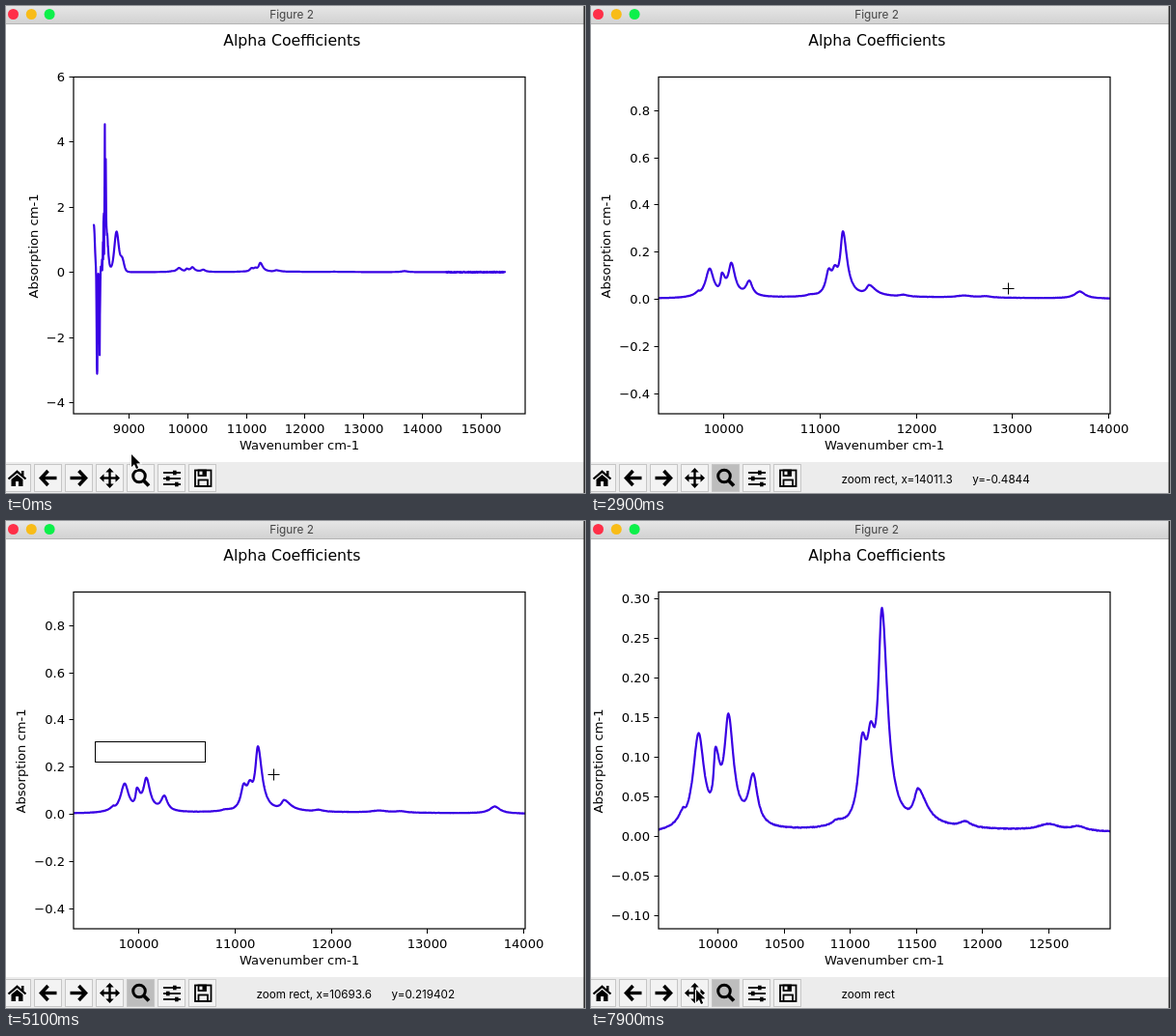
Recreate the animation shown at these times as an HTML page with a canvas. Size 600x504 px, loop 8000 ms.

```html
<!DOCTYPE html>
<html lang="en">
<head>
<meta charset="utf-8">
<title>Figure 2</title>
<style>
html, body { margin: 0; width: 600px; height: 504px; overflow: hidden; background: #fff; }
canvas { display: block; }
</style>
</head>
<body>
<canvas id="stage" width="600" height="504"></canvas>
<script>
const ctx = document.getElementById('stage').getContext('2d');
const LOOP = 8000, STEP = 100, LAG = 100;
const PLOT = { left: 70, top: 73.5, right: 538, bottom: 422 };
const PLOT_FONT = '"DejaVu Sans", sans-serif';
const UI_FONT = 'Inter, sans-serif';
const INK = '#000', CURVE = '#3900e4';

// Each view maps data to pixels; ticks are [first, last, step, decimals].
const makeView = (x0, px0, kx, py0, ky, xTicks, yTicks, labelX) => ({
  px: x => px0 + (x - x0) * kx,
  py: y => py0 - y * ky,
  x: px => x0 + (px - px0) / kx,
  y: py => (py0 - py) / ky,
  xTicks, yTicks, labelX
});
const WIDE = makeView(9000, 127.5, 0.06075, 275.5, 33.75, [9000, 15000, 1000, 0], [-4, 6, 2, 0], 28);
const MID = makeView(10000, 137.5, 0.09975, 303.5, 243.9, [10000, 14000, 1000, 0], [-0.4, 0.8, 0.2, 1], 15);
const CLOSE = makeView(10000, 131.5, 0.1372, 326.5, 820, [10000, 12500, 500, 0], [-0.1, 0.3, 0.05, 2], 7);

// Absorption bands: centre, height, half width (left, then right if it differs).
const BANDS = [
  [9738, 0.011, 51, 15], [9854, 0.12, 51], [9982, 0.075, 17, 40], [10080, 0.13, 36, 47],
  [10266, 0.062, 40], [10900, 0.006, 51], [11090, 0.09, 36], [11155, 0.08, 36],
  [11239, 0.262, 33, 51], [11512, 0.042, 36, 80], [11870, 0.007, 51], [12496, 0.008, 95],
  [12722, 0.0055, 66], [13700, 0.0295, 66]
];
// Strong features at the low end: centre, height, width.
const EDGE = [
  [8400, 1.45, 25], [8455, -3.95, 10], [8498, -3.55, 10], [8590, 2.2, 50], [8592, 3.3, 12],
  [8786, 0.85, 45], [8800, 0.4, 100], [8885, 0.25, 40]
];
const gauss = (x, c, h, w) => h * Math.exp(-(((x - c) / w) ** 2));
const lorentz = (x, c, h, wl, wr = wl) => h / (1 + ((x - c) / (x < c ? wl : wr)) ** 2);
const total = (list, shapeOf, x) => list.reduce((sum, p) => sum + shapeOf(x, ...p), 0);

function makeSpectrum() {
  let seed = 7;
  const random = () => (seed = seed * 16807 % 2147483647) / 2147483647;
  const points = [];
  for (let x = 8399; x <= 15411; x += 4) {
    const edge = total(EDGE, gauss, x) * (1 - gauss(x, 8540, 1, 70) * random());
    const ripple = (random() - 0.5) * (x > 14400 ? 0.03 : 0.001);
    points.push([x, edge + gauss(x, 11500, 0.008, 2200) + total(BANDS, lorentz, x) + ripple]);
  }
  return points;
}
const spectrum = makeSpectrum();

// Pointer keys: [time, x, y]; `at` gives a place by its data values.
const at = (view, x, y) => [view.px(x), view.py(y)];
const dragEnd = at(WIDE, 14011.3, -0.4844);
const path = [
  [0, 130, 464], [500, 139, 486], [800, 150, 250],
  [1000, ...at(WIDE, 9493.75, 0.0194909)], [1400, 147.5, 243.5], [1700, 147.5, 243.5],
  [2100, ...at(WIDE, 12163.9, 0.0754788)], [2700, ...dragEnd], [4000, ...dragEnd],
  [4650, 92.5, 228.5], [4800, 92.5, 228.5],
  [5000, ...at(MID, 10693.6, 0.219402)], [5100, 277, 262], [5800, ...at(MID, 12914.8, -0.116661)],
  [6000, 433, 332], [6900, 433, 332], [7800, 109, 485], [LOOP, 109, 485]
];
const drags = [
  { from: 1700, to: 2900, x: 147.5, y: 243.5 },
  { from: 4800, to: 6200, x: 92.5, y: 228.5 }
];

function pointerAt(t) {
  t = Math.max(0, t);
  const i = Math.max(1, path.findIndex(key => key[0] >= t));
  const [t0, x0, y0] = path[i - 1], [t1, x1, y1] = path[i];
  const u = (t - t0) / (t1 - t0), eased = u * u * (3 - 2 * u);
  return { x: x0 + (x1 - x0) * eased, y: y0 + (y1 - y0) * eased };
}
const inPlot = p => p.x > PLOT.left && p.x < PLOT.right && p.y > PLOT.top && p.y < PLOT.bottom;

function text(str, x, y, size, family, align = 'left', color = INK) {
  ctx.font = `${size}px ${family}`;
  ctx.textAlign = align;
  ctx.fillStyle = color;
  ctx.fillText(str, x, y);
}
function box(x, y, w, h, color) {
  ctx.fillStyle = color;
  ctx.fillRect(x, y, w, h);
}
function frame(x, y, w, h, width = 1, color = INK) {
  ctx.lineWidth = width;
  ctx.strokeStyle = color;
  ctx.strokeRect(x, y, w, h);
}
function line(points, width, color = INK) {
  ctx.beginPath();
  points.forEach(([x, y]) => ctx.lineTo(x, y));
  ctx.lineWidth = width;
  ctx.strokeStyle = color;
  ctx.stroke();
}
function shape(points, color = INK) {
  ctx.beginPath();
  points.forEach(([x, y]) => ctx.lineTo(x, y));
  ctx.fillStyle = color;
  ctx.fill();
}
function circle(x, y, r) {
  ctx.beginPath();
  ctx.arc(x, y, r, 0, 2 * Math.PI);
}
const crisp = v => Math.floor(v) + 0.5;

function drawTitleBar() {
  const shade = ctx.createLinearGradient(0, 0, 0, 18);
  shade.addColorStop(0, '#e6e6e6');
  shade.addColorStop(1, '#d2d2d2');
  box(0, 0, 600, 18, shade);
  box(0, 18, 600, 1, '#b4b4b4');
  ['#ff2f48', '#f8bc18', '#0cf04a'].forEach((color, i) => {
    circle(7.5 + i * 18.8, 8.5, 5.5);
    ctx.fillStyle = color;
    ctx.fill();
  });
  text('Figure 2', 296, 13, 11.8, UI_FONT, 'center', '#444');
}

function ticks([first, last, step, digits], draw) {
  const count = Math.round((last - first) / step);
  for (let i = 0; i <= count; i++) {
    const value = first + i * step;
    const label = Math.abs(value).toFixed(digits);
    draw(value, value < -1e-9 ? '\u2212' + label : label);
  }
}

function drawAxes(view) {
  text('Alpha Coefficients', 296.3, 41, 15.73, PLOT_FONT, 'center');
  text('Wavenumber cm-1', 304, 459, 13.1, PLOT_FONT, 'center');
  ctx.save();
  ctx.translate(view.labelX + 4.5, 248.5);
  ctx.rotate(-Math.PI / 2);
  text('Absorption cm-1', 0, 0, 13.1, PLOT_FONT, 'center');
  ctx.restore();
  ticks(view.xTicks, (value, label) => {
    const x = crisp(view.px(value));
    line([[x, 422], [x, 427]], 1);
    text(label, x, 441.5, 13.1, PLOT_FONT, 'center');
  });
  ticks(view.yTicks, (value, label) => {
    const y = crisp(view.py(value));
    line([[65.5, y], [70, y]], 1);
    text(label, 61, y + 4.8, 13.1, PLOT_FONT, 'right');
  });
}

function drawCurve(view) {
  const width = PLOT.right - PLOT.left, height = PLOT.bottom - PLOT.top;
  ctx.save();
  ctx.beginPath();
  ctx.rect(PLOT.left, PLOT.top, width, height);
  ctx.clip();
  ctx.lineJoin = ctx.lineCap = 'round';
  line(spectrum.map(([x, y]) => [view.px(x), view.py(y)]), 2.2, CURVE);
  ctx.restore();
  frame(PLOT.left, PLOT.top, width, height, 1.2);
}

function arrowIcon(x, dir) {
  line([[x, 481], [x - 7 * dir, 488.5], [x, 496]], 3.6);
  line([[x - 6 * dir, 488.5], [x + 9 * dir, 488.5]], 3.4);
}
const icons = [
  function home() {
    line([[2.5, 489.5], [11.5, 481.8], [20.5, 489.5]], 2.2);
    shape([[5.5, 490], [11.5, 485], [17.5, 490], [17.5, 497], [5.5, 497]]);
    box(10, 492, 3, 5, '#f3f3f3');
    box(16, 481, 2.5, 5, INK);
  },
  () => arrowIcon(43.5, 1),
  () => arrowIcon(75.5, -1),
  function pan() {
    for (let i = 0; i < 4; i++) {
      ctx.save();
      ctx.translate(107.5, 488.5);
      ctx.rotate(i * Math.PI / 2);
      line([[0, 0], [8, 0]], 2.4);
      shape([[10.5, 0], [6, -4.2], [6, 4.2]]);
      ctx.restore();
    }
  },
  function zoom() {
    line([[142.5, 491], [148, 496.5]], 3.8);
    circle(138, 486.5, 6.3);
    ctx.lineWidth = 3;
    ctx.stroke();
  },
  function sliders() {
    [173, 166, 175].forEach((knob, i) => {
      const y = 483 + i * 6;
      line([[163, y], [181, y]], 1.8);
      box(knob, y - 2.3, 3.6, 4.6, INK);
    });
  },
  function save() {
    frame(196, 480.5, 16.5, 16.5, 1.8);
    frame(199.5, 490.5, 9.5, 6.5, 1.8);
    frame(199.5, 480.5, 7.5, 5.5, 1.8);
    box(203.5, 481, 3, 4, INK);
  }
];

function drawToolbar(zooming, readout) {
  box(0, 472, 600, 32, '#ececec');
  icons.forEach((icon, i) => {
    const x = -3 + i * 32;
    box(x, 474, 29, 29, zooming && icon.name === 'zoom' ? '#bdbdbd' : '#f3f3f3');
    frame(x + 0.5, 474.5, 28, 28, 1, '#c6c6c6');
    icon();
  });
  if (!zooming) return;
  const head = readout ? `zoom rect, x=${readout.x}` : 'zoom rect';
  text(head, 259.5, 493.5, 11.7, UI_FONT);
  if (readout) text(`y=${readout.y}`, 280 + ctx.measureText(head).width, 493.5, 11.7, UI_FONT);
}

function drawCross({ x, y }) {
  const cx = Math.round(x) + 0.5, cy = Math.round(y) + 0.5;
  const bars = [[[cx - 6, cy], [cx + 6, cy]], [[cx, cy - 6], [cx, cy + 6]]];
  bars.forEach(bar => line(bar, 3, 'rgba(255,255,255,0.8)'));
  bars.forEach(bar => line(bar, 1));
}
function drawArrow({ x, y }) {
  const outline = [[0, 0], [0, 13], [3, 10.3], [5, 15], [7.2, 14], [5.2, 9.5], [9.2, 9.3], [0, 0]]
    .map(([dx, dy]) => [x + dx, y + dy]);
  line(outline, 2, '#fff');
  shape(outline);
}

const significant = v => String(Number(v.toPrecision(6)));

function render(t) {
  const view = t < 2900 ? WIDE : t < 6200 ? MID : CLOSE;
  // The readout keeps its old values until the pointer moves again.
  const readoutView = t <= 4000 ? WIDE : t < 7000 ? MID : CLOSE;
  const zooming = t >= 500;
  const pointer = pointerAt(t), reported = pointerAt(t - LAG);

  box(0, 0, 600, 504, '#fff');
  drawAxes(view);
  drawCurve(view);
  const drag = drags.find(d => t > d.from && t < d.to);
  if (drag) frame(drag.x, drag.y, crisp(reported.x) - drag.x, crisp(reported.y) - drag.y);
  drawTitleBar();
  drawToolbar(zooming, inPlot(reported) && inPlot(pointer) && {
    x: significant(readoutView.x(reported.x)),
    y: significant(readoutView.y(reported.y))
  });
  box(598.5, 0, 1.5, 504, '#2c2c2c');
  if (zooming && inPlot(pointer)) drawCross(pointer);
  else drawArrow(pointer);
}

function tick() {
  const t = performance.now() % LOOP;
  render(Math.floor(t / STEP) * STEP);
  requestAnimationFrame(tick);
}
tick();
</script>
</body>
</html>
```
